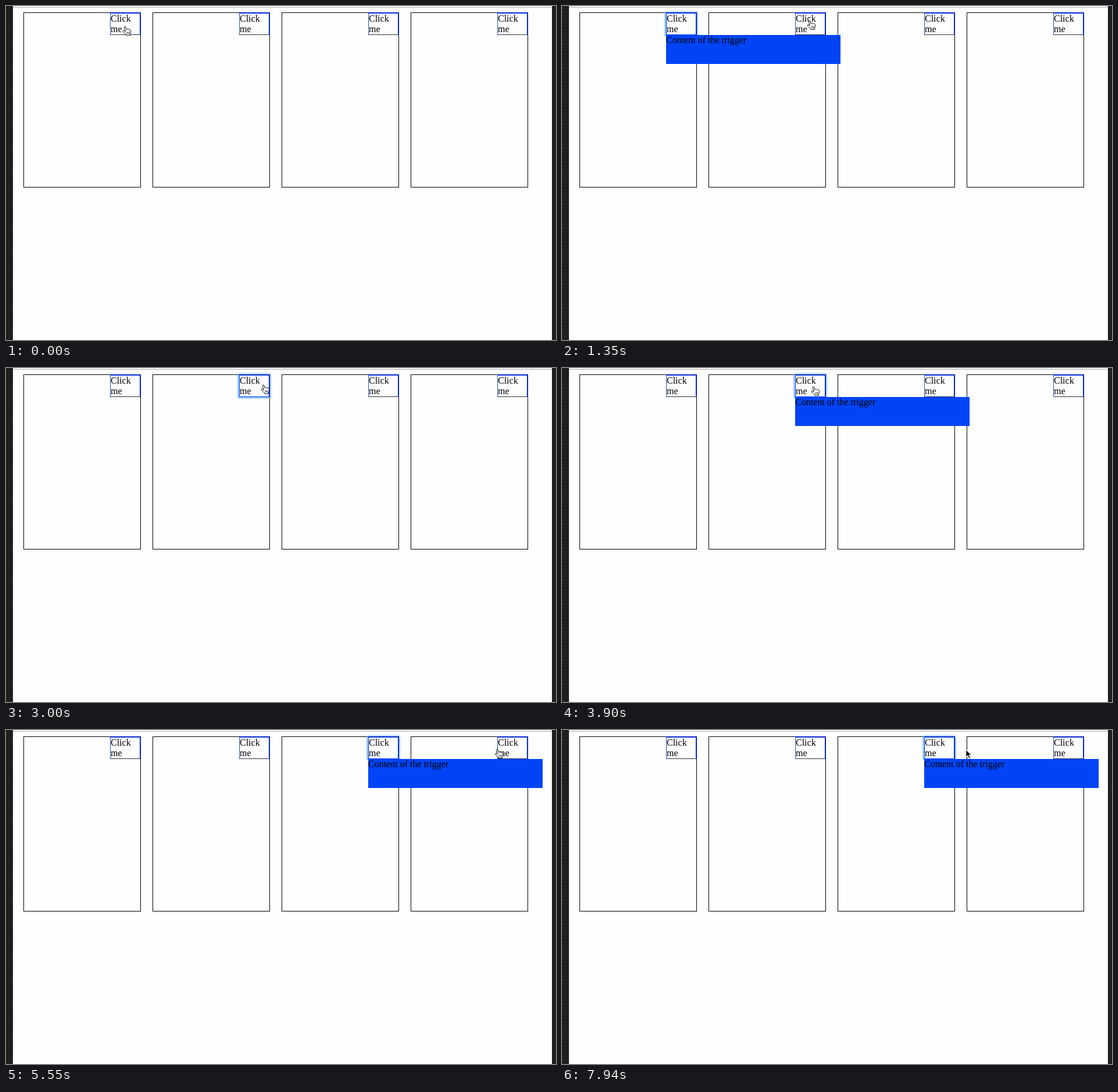
These frames come from a looping animation (946x576 px, 8000 ms). An HTML page:

```html
<!DOCTYPE html>
<html lang="en">
<head>
<meta charset="utf-8">
<title>Click triggers</title>
<style>
html, body { margin: 0; width: 100%; height: 100%; overflow: hidden; }
body { position: relative; background: #fefefe; color: #000; font: 16px/18px "Liberation Serif", serif; }
body > *, .trigger { position: absolute; box-sizing: border-box; }
.edge { top: 0; bottom: 0; background: #22201e; }
.left { left: 0; width: 12px; background: radial-gradient(circle at 2px 2px, #171614 1px, #24221f 2px) 0 0 / 6px 6px; }
.right { left: 939px; width: 7px; }
.bar { left: 12px; width: 927px; height: 3px; background: #f3f3f3; border-bottom: 1px solid #b4b4b4; }
.panel { top: 11px; width: 202px; height: 302px; border: 1px solid #000; }
.trigger {
  right: 0; top: 0; width: 52px; height: 38px;
  border: 1px solid; border-color: #0030ff #0030ff #2c3040 #2b4bb0;
}
.trigger::after {
  content: ""; position: absolute; inset: -2px -2px -1px -1px;
  border: solid #0018b0; border-width: 1px 1px 0 0;
}
.focused { box-shadow: 0 0 3px 2px #66adf5; border-color: #0040ff; }
.popup { top: 50px; width: 300px; height: 50px; background: #0044f6; }
svg { left: 0; top: 0; width: 18px; height: 19px; overflow: visible; }
</style>
</head>
<body>
<div class="edge left"></div>
<div class="edge right"></div>
<div class="bar"></div>
<div class="popup">Content of the trigger</div>
<svg id="hand" fill="#fff" stroke="#000" stroke-linejoin="round" stroke-linecap="round">
  <path d="M5.2 9.6 3.3 3.2C2.8 1 5 .4 5.7 2L7.2 6.5C7.5 5.3 9.2 5.2 9.7 6.4 10.4 5.4 11.8 5.6 12.2 6.9 13.1 6.3 14.4 6.9 14.5 8.3 14.9 10.5 14.6 12 13.6 13.7L13.4 16.3H6.9C6.4 14.3 3.4 12.4 1.5 10 .6 8.6 2.2 7.6 3.6 8.6Z"/>
  <path d="M8.1 11v2.8M10.1 11v2.8M12.1 11v2.8" stroke-width=".8"/>
</svg>
<svg id="arrow">
  <path d="M.7.7V14.2L3.8 11.3 6 16.3 8.6 15.2 6.4 10.3H10.6Z" fill="#000" stroke="#fff" stroke-width="1.2"
    style="filter: drop-shadow(0 1px 1px #0005)"/>
</svg>
<script>
const LOOP = 8000;
const popup = document.querySelector(".popup");
const cursors = { hand: document.getElementById("hand"), arrow: document.getElementById("arrow") };
const popupLefts = [179, 401, 623, 613];

const triggers = popupLefts.map((_, i) => {
  const panel = document.createElement("div");
  panel.className = "panel";
  panel.style.left = 30 + 222 * i + "px";
  panel.innerHTML = '<div class="trigger">Click me</div>';
  popup.before(panel);
  return panel.firstChild;
});

// [time, cursor, x, y]
const moves = [
  [0, "hand", 200, 34],
  [900, "hand", 211, 34], [1050, "arrow", 296, 33], [1200, "hand", 407, 22], [1350, "hand", 421, 24],
  [2250, "arrow", 476, 29], [2400, "arrow", 490, 30], [2550, "hand", 445, 29], [2700, "hand", 438, 28],
  [3450, "hand", 445, 32], [3600, "hand", 428, 31],
  [4200, "arrow", 480, 36], [4350, "arrow", 596, 38], [4500, "hand", 649, 29],
  [5250, "arrow", 690, 33], [5400, "arrow", 788, 35], [5550, "hand", 840, 32],
  [5700, "hand", 851, 31], [5850, "hand", 857, 30],
  [6600, "arrow", 741, 24], [6750, "arrow", 692, 28], [6900, "hand", 655, 30], [7050, "hand", 650, 30],
  [7940, "arrow", 694, 33]
];

// [time, focused trigger, open popup]; -1 means none
const clicks = [
  [0, -1, -1], [450, 0, 0], [3000, 1, -1], [3900, 1, 1],
  [4950, 2, 2], [6000, 3, 3], [7190, 2, 2]
];

const latest = (steps, time) => steps.findLast(step => step[0] <= time);

function draw(now) {
  const time = now % LOOP;
  const [, focused, open] = latest(clicks, time);
  const [, shape, x, y] = latest(moves, time);
  triggers.forEach((trigger, i) => trigger.classList.toggle("focused", i === focused));
  popup.style.display = open < 0 ? "none" : "block";
  if (open >= 0) popup.style.left = popupLefts[open] + "px";
  for (const name in cursors) {
    cursors[name].style.display = name === shape ? "block" : "none";
  }
  cursors[shape].style.transform = `translate(${x}px, ${y}px)`;
  requestAnimationFrame(draw);
}
requestAnimationFrame(draw);
</script>
</body>
</html>
```
